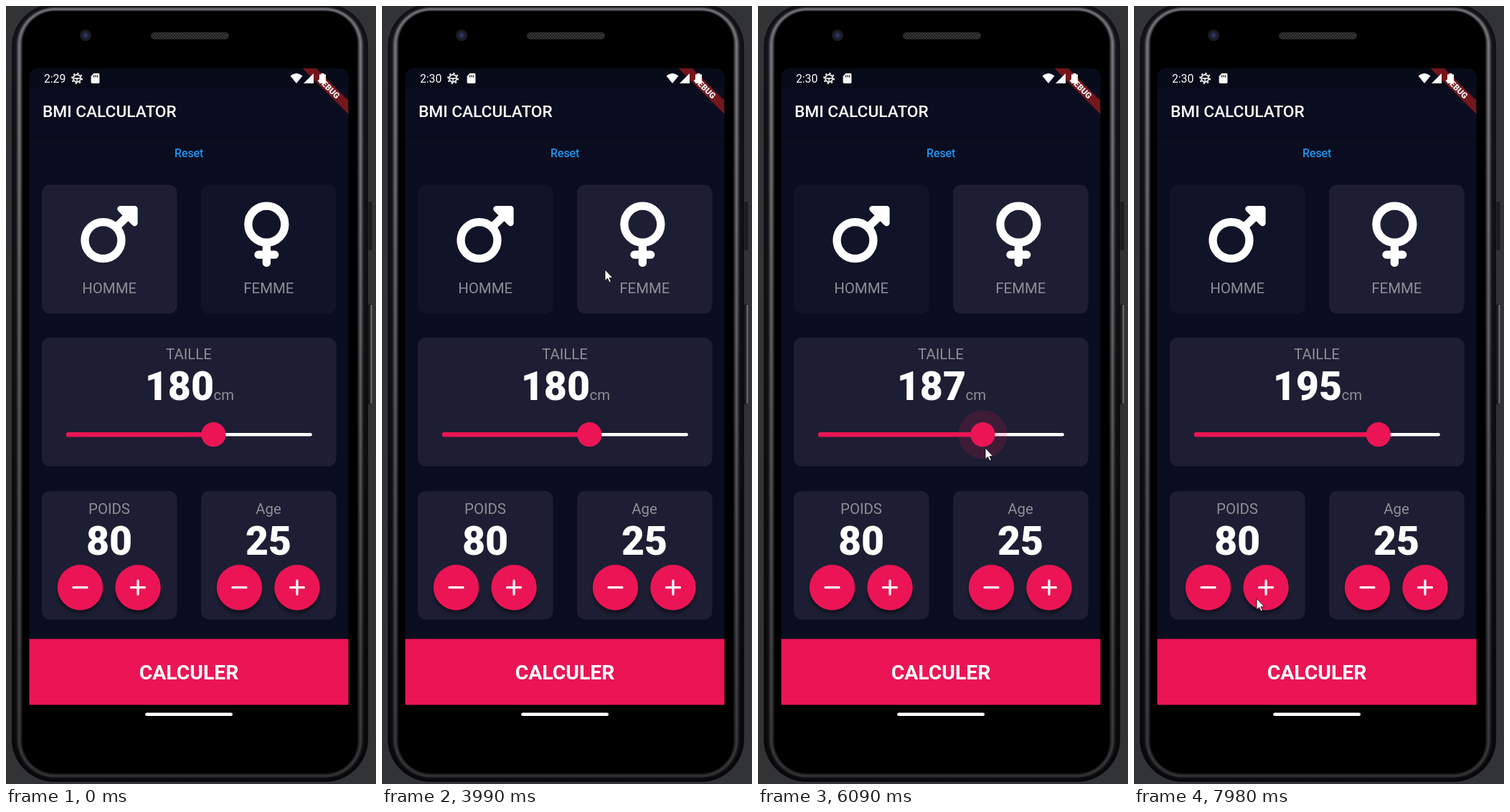
An HTML page for the animation above (8000 ms loop, 516x1086 px).

```html
<!DOCTYPE html>
<html lang="fr">
<head>
<meta charset="utf-8">
<title>BMI calculator</title>
<style>
  html, body { margin: 0; width: 100%; height: 100%; overflow: hidden; background: #323335; }
  svg { display: block; width: 516px; height: 1086px; font-family: Roboto, sans-serif; }
  .label { font-size: 20.4px; fill: #8d8e98; }
  .number { font-size: 55.4px; font-weight: 900; fill: #fff; }
  .mid { text-anchor: middle; }
  .on { fill: #1d1e33; }
  .off { fill: #111328; }
  .pink { fill: #eb1555; }
  .line { fill: none; stroke: #fff; stroke-linecap: round; }
  .btn { filter: drop-shadow(0 5px 2px rgba(0, 0, 0, .4)); }
</style>
</head>
<body>
<svg viewBox="0 0 516 1086">
  <defs>
    <pattern id="mesh" width="4" height="4" patternUnits="userSpaceOnUse">
      <path d="M0 0h2v2h-2zM2 2h2v2h-2z" fill="#3a3a3a"/>
    </pattern>
    <linearGradient id="shade" x2="0" y2="1">
      <stop offset=".05" stop-opacity="0"/><stop offset="1" stop-opacity=".55"/>
    </linearGradient>
    <clipPath id="screen"><path d="M32.500 975.500V99a12 12 0 0 1 12-12H465.500a12 12 0 0 1 12 12V975.500z"/></clipPath>
  </defs>

  <!-- phone body -->
  <path d="M508 273V341" stroke="#1c1d1e" stroke-width="5"/>
  <path d="M508 416V556" stroke="#1c1d1e" stroke-width="6"/>
  <path d="M509.500 417V555" stroke="#77787a" stroke-width="2"/>
  <g id="rim"></g>
  <circle cx="111" cy="41" r="8" fill="#1a1b20"/>
  <circle cx="111" cy="41" r="4.500" fill="#232747"/>
  <circle cx="111" cy="41" r="2" fill="#343b70"/>
  <rect x="202.500" y="37" width="108" height="9" rx="4.500" fill="#1e1e1e"/>
  <rect x="202.500" y="37" width="108" height="9" rx="4.500" fill="url(#mesh)" stroke="#2b2b2b"/>

  <!-- screen -->
  <g clip-path="url(#screen)">
    <path d="M32 87H478V976H32z" fill="#0a0d20"/>
    <path d="M32 87H478V115H32z" fill="#070a18"/>
    <path d="M32 183H478" stroke="#080b1a" stroke-width="3"/>
    <path class="pink" d="M32 883.500H478V976H32z"/>
    <path d="M413.400 87H432.600L477.500 132V151.100z" fill="#b71c1c" fill-opacity=".61"/>
    <text class="mid" transform="translate(450.300 114.200) rotate(45)" y="4.100" font-size="11.560" font-weight="900" fill="#fff">DEBUG</text>
  </g>
  <rect x="194" y="986.500" width="122" height="4.500" rx="2.250" fill="#fff"/>

  <!-- status bar -->
  <g fill="#fff">
    <text id="clock" x="53" y="107" font-size="15.700">2:29</text>
    <g fill="none" stroke="#fff">
      <circle cx="99" cy="101" r="5.200" stroke-width="1.700"/>
      <circle cx="99" cy="101" r="7" stroke-width="1.800" stroke-dasharray="2.400 3.098"/>
      <path d="M95 101H103M99 101V105" stroke-width="1.500"/>
    </g>
    <path d="M122.500 94H129a1.400 1.400 0 0 1 1.400 1.400V106.600a1.400 1.400 0 0 1-1.400 1.400H120a1.400 1.400 0 0 1-1.400-1.400V98z"/>
    <path d="M122.500 96.500v3M125 96.500v3M127.500 96.500v3" stroke="#070a18" stroke-width="1.200"/>
    <path d="M396.500 97.500Q405 90.500 413.500 97.500L405 108z"/>
    <path d="M429 94V108H415z"/>
    <path d="M439.500 94H443.500V95.500H446V108H437V95.500H439.500z"/>
  </g>

  <text x="51" y="155" font-size="22.660" font-weight="500" fill="#fff">BMI CALCULATOR</text>
  <text class="mid" x="255.200" y="211" font-size="15.870" font-weight="500" fill="#2196f3">Reset</text>

  <!-- gender cards -->
  <rect id="man" x="50" y="249.500" width="188.500" height="180" rx="11.300"/>
  <rect id="woman" x="272" y="249.500" width="188.500" height="180" rx="11.300"/>
  <g transform="translate(104.300 273.300) scale(.177)">
    <circle class="line" cx="176" cy="304" r="144" stroke-width="64"/>
    <path fill="#fff" d="M289.800 46.800c3.700-9 12.500-14.800 22.200-14.800H424c13.300 0 24 10.700 24 24V168c0 9.700-5.800 18.500-14.800 22.200s-19.300 1.700-26.200-5.200l-33.400-33.400L300 225 255 180 328.400 106.400 295 73c-6.900-6.900-8.900-17.200-5.200-26.200z"/>
  </g>
  <g class="line" transform="translate(329.400 273.500) scale(.177)" stroke-width="64">
    <circle cx="192" cy="176" r="144"/>
    <path d="M192 330V480M128 416H256"/>
  </g>
  <text class="label mid" x="144.200" y="400.500">HOMME</text>
  <text class="label mid" x="366.300" y="400.500">FEMME</text>

  <!-- height card -->
  <rect class="on" x="50" y="463" width="410.500" height="179.500" rx="11.300"/>
  <text class="label mid" x="255" y="493">TAILLE</text>
  <text class="number" id="height" x="193.700" y="549.500">180</text>
  <text class="label" x="289.600" y="549.500">cm</text>
  <path class="line" d="M100 598.200H424.600" stroke-width="4.500"/>
  <path id="track" class="line" style="stroke:#eb1555" stroke-width="6.400"/>
  <g id="thumb">
    <circle id="halo" class="pink" fill-opacity=".16"/>
    <circle class="pink" r="17.100"/>
  </g>

  <g id="counters"></g>
  <text class="mid" x="255" y="939.500" font-size="28.330" font-weight="700" fill="#fff">CALCULER</text>

  <path id="cursor" d="M0 0V15.500L3.600 12.300 6 17.800 8.300 16.800 6 11.600H10.800z" fill="#fff" stroke="#000" stroke-width=".8"/>
</svg>
<script>
const $ = id => document.getElementById(id);

const shell = (inset, paint) => `<rect x="${8 + inset}" y="${inset * .7 - 3}" rx="${60 - inset}"
  width="${497 - 2 * inset}" height="${1086 - 1.5 * inset}" ${paint}/>`;

// Metal rim: nested shells, brightest near the inner edge
let rim = '';
for (let i = 0; i < 16; i++) {
  const g = Math.round(18 + 100 * Math.exp(-(((i - 10) / 3) ** 2)));
  rim += shell(i, `fill="rgb(${g},${g},${g + 4})"`);
}
$('rim').innerHTML = rim + shell(0, 'fill="url(#shade)"') + shell(15, 'fill="#000"');

const button = (x, sign) => `<circle class="pink btn" cx="${x}" cy="811.700" r="31.700"/>
  <path class="line" stroke-width="3.200" d="M${x - 9.5} 811.700h19${sign === '+' ? `M${x} 802.200v19` : ''}"/>`;

const counter = (x, label, value) => `<rect class="on" x="${x}" y="677" width="188.500" height="179.500" rx="11.300"/>
  <text class="label mid" x="${x + 94}" y="709">${label}</text>
  <text class="number mid" x="${x + 94}" y="765.500">${value}</text>
  ${button(x + 53.5, '-')}${button(x + 134, '+')}`;

$('counters').innerHTML = counter(50, 'POIDS', 80) + counter(272, 'Age', 25);

// Pointer moves: first step, last step, then x, y and height in cm on arrival
const moves = [
  [740, 1300, 204, 455, 180],
  [1600, 2160, 316, 371, 180],
  [2440, 2980, 195, 371, 180],
  [3410, 3560, 315, 359, 180],
  [3990, 3990, 311, 368, 180],
  [4130, 4560, 296, 600, 180],
  [4840, 5540, 190, 606, 153],
  [5680, 5820, 222, 614, 161],
  [5960, 6090, 317, 617, 187],
  [6230, 6380, 366, 621, 203],
  [6520, 7100, 340, 624, 198],
  [7250, 7980, 171, 827, 195]
];
const home = [522, 1105, 180];

// The picture advances in steps of about 143 ms within each move
function pose(t) {
  const i = moves.findLastIndex(m => m[0] <= t);
  if (i < 0) return [0, ...home];
  const [start, end, ...to] = moves[i];
  const from = i ? moves[i - 1].slice(2) : home;
  const gaps = Math.round((end - start) / 143);
  const step = gaps ? Math.min(gaps, Math.floor((t - start) / (end - start) * gaps + 1e-6)) : 0;
  const p = (step + 1) / (gaps + 1);
  const ease = p * p * (3 - 2 * p);
  return [start + step * 143, ...to.map((v, k) => from[k] + (v - from[k]) * ease)];
}

const clamp = v => Math.max(0, Math.min(1, v));

function draw(t) {
  const [time, x, y, cm] = pose(t);
  const value = Math.round(cm);
  const knob = 83.6 + (value - 120) * 3.43;
  const grow = clamp((time - 4840) / 140) * clamp((7400 - time) / 150);

  $('clock').textContent = t < 440 ? '2:29' : '2:30';
  $('man').setAttribute('class', t < 2440 ? 'on' : 'off');
  $('woman').setAttribute('class', t < 2440 ? 'off' : 'on');
  $('height').textContent = value;
  $('track').setAttribute('d', `M87 598.200H${knob}`);
  $('thumb').setAttribute('transform', `translate(${knob} 598.200)`);
  $('halo').setAttribute('r', 34 * grow);
  $('cursor').setAttribute('transform', `translate(${x} ${y})`);
  $('cursor').style.display = t < 740 ? 'none' : '';
}

const began = performance.now();
function loop() {
  draw((performance.now() - began) % 8000);
  requestAnimationFrame(loop);
}
loop();
</script>
</body>
</html>
```
